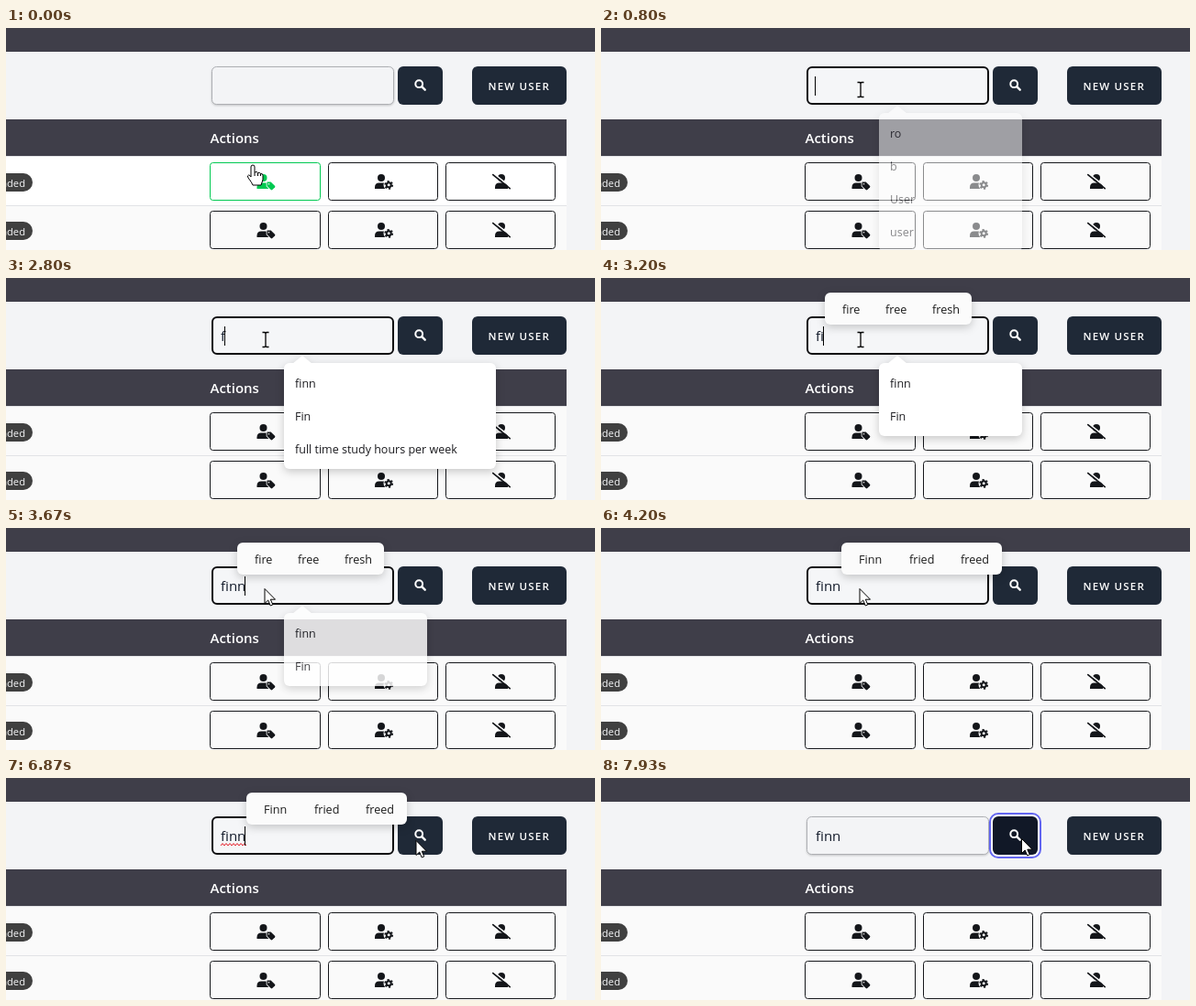
An HTML page for the animation above (8 s loop, 642 by 243 pixels).

```html
<!DOCTYPE html>
<html lang="en">
<head>
<meta charset="utf-8">
<title>User search</title>
<style>
  html, body { margin: 0; width: 100%; height: 100%; overflow: hidden; background: #f3f4f6; }
  svg { display: block; width: 642px; height: 243px; font-family: "Open Sans", "Noto Sans", sans-serif; }
  .float { filter: drop-shadow(0 3px 5px #0003); }
  .field { filter: drop-shadow(0 1px 1px #0003); }
</style>
</head>
<body>
<svg id="stage" viewBox="0 0 642 243"></svg>
<script>
const stage = document.getElementById("stage");
const TICKS_PER_SECOND = 15, LOOP_TICKS = 120;
const DARK = "#3f3e49", NAVY = [31, 41, 55], INK = "#14161a", GREEN = "#00c951", PAPER = "#fafafa";

// Moments of the story, in ticks
const LEAVE = 1, FOCUS = 12, KEYS = [42, 48, 51, 55], WORDS_IN = 44, ARROW = 54,
  WORDS_SWAP = 57, SPELLCHECK = 70, HOVER = 109, PRESS = 117;
const NAME = "finn";

const ruler = document.createElement("canvas").getContext("2d");
ruler.font = '15px "Open Sans", "Noto Sans", sans-serif';

const clamp = v => Math.max(0, Math.min(1, v));
const ramp = (k, start, end) => clamp((k - start) / (end - start));
const ease = p => p * p * (3 - 2 * p);
const mix = (a, b, p) => a + (b - a) * p;
const mixColor = (a, b, p) => `rgb(${a.map((v, i) => Math.round(mix(v, b[i], p)))})`;

const rect = (x, y, w, h, fill, rx = 0, extra = "") =>
  `<rect x="${x}" y="${y}" width="${w}" height="${h}" rx="${rx}" fill="${fill}" ${extra}/>`;
const text = (x, y, size, content, extra = "") =>
  `<text x="${x}" y="${y}" font-size="${size}" ${extra}>${content}</text>`;
const at = (x, y, content) => `<g transform="translate(${x} ${y})">${content}</g>`;

const person = x => `<circle cx="${x}" cy="4" r="4"/>
  <path d="M${x - 7} 16v-1.8q0-4.7 4.7-4.7h4.6q4.7 0 4.7 4.7V16z"/>`;

const icons = [
  (ink, paper) => person(7) + `<path d="M11 8.6h4.2l4.3 4.2q.8.8 0 1.6l-2.7 2.7q-.8.8-1.6 0L11 12.9z"
    stroke="${paper}" stroke-width="1.6" paint-order="stroke"/><circle cx="13" cy="10.7" r=".8" fill="${paper}"/>`,
  (ink, paper) => person(7) + `<circle cx="15.2" cy="11.8" r="5.7" fill="${paper}"/>
    <g fill="none" stroke="${ink}" stroke-width="2"><circle cx="15.2" cy="11.8" r="2.5"/>
    <circle cx="15.2" cy="11.8" r="3.9" stroke-dasharray="2.04"/></g>`,
  (ink, paper) => person(10) + `<g fill="none" stroke-linecap="round">
    <path d="M1.5-.6 20 13.9" stroke="${paper}" stroke-width="1.6"/>
    <path d="M.8.6 19.2 15.6" stroke="${ink}" stroke-width="1.7"/></g>`
];

function actionButton(column, y, paper, hovered) {
  const x = [222, 351, 479][column], w = column ? 120 : 121;
  const ink = hovered ? GREEN : INK;
  return rect(x + .5, y + .5, w - 1, 41, "none", 3, `stroke="${ink}"`) +
    at([273.5, 402, 530][column], y + 13, `<g fill="${ink}">${icons[column](ink, paper)}</g>`);
}

function row(y, paper, hovered) {
  return rect(0, y, 611, 53, paper) + rect(0, y + 53, 611, 1, "#e2e3e6") +
    rect(-60, y + 18, 89, 20, "#404040", 10) +
    text(21, y + 32.8, 11.2, "Suspended", 'fill="#f3f4f6" text-anchor="end"') +
    [0, 1, 2].map(i => actionButton(i, y + 6, paper, hovered && i === 0)).join("");
}

function searchButton(k) {
  const hover = mixColor(NAVY, [55, 65, 81], ramp(k, HOVER, HOVER + 3));
  const fill = k < PRESS ? hover : mixColor([55, 65, 81], [17, 24, 39], ramp(k, PRESS - 1, PRESS + 2));
  const ring = k < PRESS ? "" : rect(424, 39, 55, 48, "#fff", 9, 'stroke="#6366f1" stroke-width="2"');
  return ring + rect(427, 42, 49, 42, fill, 6) +
    `<g fill="none" stroke="#fff" stroke-width="2"><circle cx="450.2" cy="61.2" r="3.9"/>
    <path d="m453.2 64.2 3.5 3.5" stroke-width="2.4" stroke-linecap="round"/></g>`;
}

function inputField(k, typed, focused) {
  const box = focused
    ? rect(225, 43, 197, 40, "#f5f6f8", 5, 'stroke="#0b0b0d" stroke-width="2"')
    : rect(224.5, 42.5, 198, 41, "#f3f4f6", 5, 'stroke="#adafb3" class="field"');
  const width = ruler.measureText(typed).width;
  const lastKey = KEYS.filter(key => key <= k).pop() ?? FOCUS;
  const caretOn = focused && Math.floor((k - lastKey) / 8) % 2 === 0;
  const squiggle = focused && k >= SPELLCHECK
    ? `<path d="M234 74${"l2-2.4 2 2.4".repeat(7)}" fill="none" stroke="#e5202b"/>` : "";
  return box + text(234, 69, 15, typed, 'fill="#101828"') + squiggle +
    (caretOn ? rect(Math.round(233 + width), 53, 1, 21, "#000") : "");
}

function autofill(k, typed) {
  const opacity = Math.min(ramp(k, FOCUS - 1, FOCUS + 1), 1 - ramp(k, 54.4, 57.9));
  if (!opacity) return "";
  const items = !typed ? ["ro", "b", "User", "user"]
    : [NAME, "Fin", ...(typed === "f" ? ["full time study hours per week"] : [])];
  const w = typed === "f" ? 231 : 156;
  return `<g class="float" opacity="${opacity}"><path d="m312 94 11-9 11 9z" fill="#fff"/>` +
    rect(303, 93, w, items.length * 36 + 8, "#fff", 6) +
    items.map((item, i) => text(315, 120 + i * 36, 12.5, item, 'fill="#1b1b1f" font-weight="500"')).join("") + "</g>";
}

function wordHints(k, typed) {
  if (k < WORDS_IN || k >= PRESS) return "";
  const done = k >= WORDS_SWAP;
  const left = done ? 262 : [239, 244, 252, 252][typed.length - 1];
  const words = done ? ["Finn", "fried", "freed"] : ["fire", "free", "fresh"];
  const offsets = done ? [19, 74, 130] : [19, 66, 117];
  return `<g class="float">` + rect(left, 16, done ? 175 : 160, 35, "#fbfbfb", 6) +
    words.map((word, i) => text(left + offsets[i], 38.5, 12.6, word, 'fill="#1b1b1b"')).join("") + "</g>";
}

const pointers = {
  hand: `<path d="M-2 13V2Q-2 0 0 0T2 2V8Q5 6.5 5.5 8.5 8 7.5 8.5 9.5 11 9 11 11.5V16Q10 19 9 22H0Q-1 19-5 14-6.5 11.5-4.5 11-3 11-2 13Z
    M2 8v4M5.5 8.5V12M8.5 9.5V12" fill="#fff" stroke="#000"/>`,
  arrow: `<path d="M0 0V16l3.7-3.5 2.5 6 2.6-1.1-2.5-5.7H11.5Z" fill="#fff" stroke="#000"/>`,
  beam: `<path d="M-3.5-7.5h2.5l1 1 1-1h2.5M0-6.5v14M-3.5 8.5H-1l1-1 1 1h2.5" fill="none" stroke="#000" stroke-width="1.3"/>`
};

function pointer(k) {
  if (k < ARROW) {
    const p = ease(ramp(k, LEAVE - 1, 7));
    const y = mix(150, 67, p);
    const shape = k < LEAVE || y > 147 ? "hand" : y > 84 ? "arrow" : "beam";
    return at(mix(269, 283, p), y, pointers[shape]);
  }
  const across = ease(ramp(k, 82, 91)), nudge = ease(ramp(k, HOVER - 1, 114));
  return at(282 + 165 * across + 11.5 * nudge, 66.5 + 2 * across - 2 * nudge, pointers.arrow);
}

function scene(k) {
  const typed = NAME.slice(0, KEYS.filter(key => key <= k).length);
  const focused = k >= FOCUS && k < PRESS;
  return rect(0, 0, 642, 243, "#f3f4f6") + rect(0, 0, 642, 26, DARK) +
    rect(0, 100, 611, 40, DARK) + rect(0, 140, 611, 1, "#e2e3e6") +
    text(222.5, 126, 15, "Actions", 'fill="#fff" font-weight="600"') +
    row(141, k < FOCUS ? "#fff" : PAPER, k < LEAVE + 1) + row(194, PAPER, false) +
    rect(0, 194, 611, 1, "#e2e3e6") +
    inputField(k, typed, focused) + searchButton(k) +
    rect(508, 42, 103, 42, mixColor(NAVY, NAVY, 0), 6) +
    text(525.5, 67.5, 11.5, "NEW USER", 'fill="#fff" font-weight="600" letter-spacing="1.2"') +
    autofill(k, typed) + wordHints(k, typed) + pointer(k);
}

let shown = -1;
function frame() {
  // A small lead absorbs rounding at tick boundaries
  const k = Math.floor((performance.now() + 5) * TICKS_PER_SECOND / 1000) % LOOP_TICKS;
  if (k !== shown) stage.innerHTML = scene(shown = k);
  requestAnimationFrame(frame);
}
frame();
</script>
</body>
</html>
```
